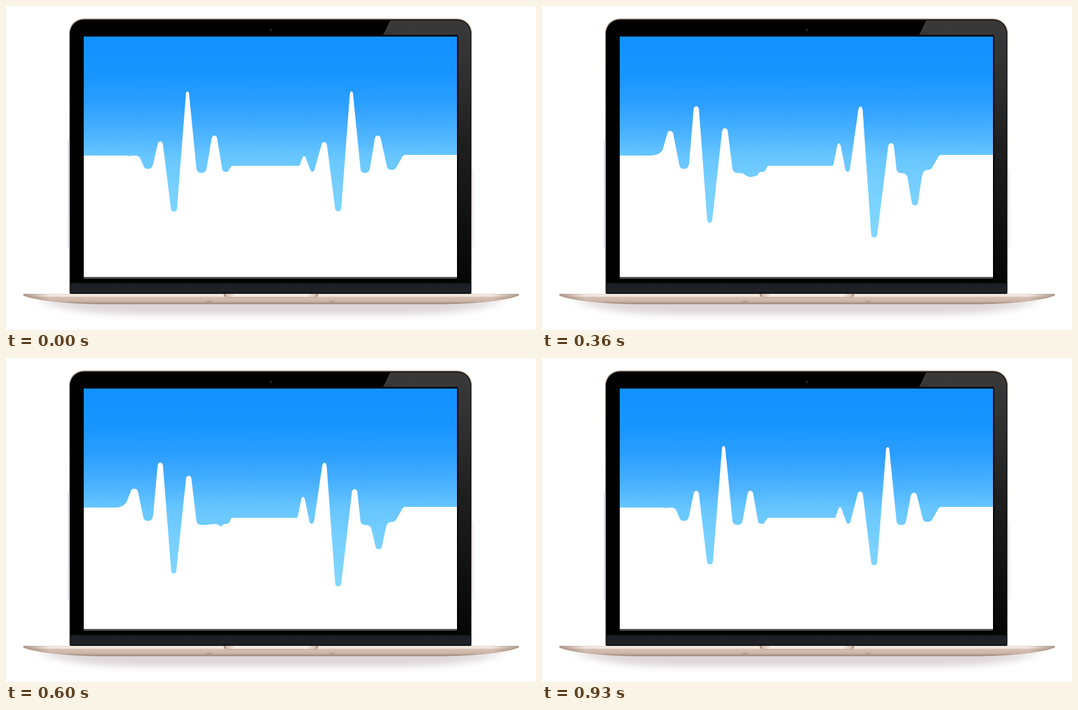
Write an HTML page with a canvas that moves like this. It is 852x520 px and loops after 960 ms.

```html
<!DOCTYPE html>
<html lang="en">
<head>
<meta charset="utf-8">
<title>Pulse on a laptop</title>
<style>
html, body { margin: 0; width: 100%; height: 100%; overflow: hidden; background: #fff; }
canvas { display: block; }
</style>
</head>
<body>
<canvas id="stage" width="852" height="520"></canvas>
<script>
const W = 852, H = 520, LOOP = 960, STEP = 30, TURN = 450, BUMP_FALL = 385;
const SCREEN = { x: 125, y: 49, w: 600, h: 386 };
const ctx = document.getElementById('stage').getContext('2d');

function gradient(c, x0, y0, x1, y1, stops) {
  const g = c.createLinearGradient(x0, y0, x1, y1);
  stops.forEach(([at, color]) => g.addColorStop(at, color));
  return g;
}

function box(c, x, y, w, h, fill, radii = 0) {
  c.beginPath();
  c.roundRect(x, y, w, h, radii);
  c.fillStyle = fill;
  c.fill();
}

function drawShadow(c) {
  c.save();
  c.filter = 'blur(6px)';
  c.beginPath();
  c.moveTo(48, 472);
  c.bezierCurveTo(90, 488, 150, 495, 230, 495);
  c.lineTo(622, 495);
  c.bezierCurveTo(702, 495, 762, 488, 804, 472);
  c.closePath();
  c.fillStyle = '#ddd5d8';
  c.fill();
  c.restore();
}

function drawLid(c) {
  box(c, 99.5, 215, 1.5, 172, '#dcd9e9');
  box(c, 750, 262, 1.5, 125, '#ece6ee');
  box(c, 99.5, 401, 1, 2, '#e9e2da');
  box(c, 99.5, 406, 1, 2, '#e9e2da');
  const rim = gradient(c, 0, 20, 0, 462, [[0, '#bfa99c'], [0.06, '#dcc8bb'], [1, '#eaddd4']]);
  box(c, 101, 20, 648.5, 443, rim, [24, 24, 4, 4]);
  box(c, 102.5, 21.5, 645.5, 441, '#000', [22.5, 22.5, 3, 3]);

  // Reflection along the right bezel
  c.save();
  c.beginPath();
  c.roundRect(104, 23, 643, 421, [21, 21, 0, 0]);
  c.clip();
  c.beginPath();
  c.moveTo(617.5, 23);
  c.lineTo(606, 47);
  c.lineTo(726, 47);
  c.lineTo(726, 444);
  c.lineTo(748, 444);
  c.lineTo(748, 23);
  c.closePath();
  c.fillStyle = gradient(c, 0, 23, 0, 444,
    [[0, '#393939'], [0.15, '#333'], [0.45, '#202020'], [0.75, '#111'], [1, '#060606']]);
  c.fill();
  c.restore();

  box(c, 123.5, 46.5, 603.5, 391.5, '#000', 2);
  box(c, 125, 436, 600, 1, '#b5b5b5');
  c.beginPath();
  c.arc(426, 38.5, 2, 0, 7);
  c.fillStyle = '#252525';
  c.fill();

  box(c, 104, 444, 643, 18,
    gradient(c, 0, 444, 0, 462, [[0, '#111316'], [0.15, '#1c1f23'], [0.8, '#1e2125'], [1, '#121315']]));
}

function drawBase(c) {
  c.beginPath();
  c.moveTo(28, 462);
  c.lineTo(824, 462);
  c.lineTo(824, 465);
  c.bezierCurveTo(800, 473, 760, 478.5, 690, 478.5);
  c.lineTo(162, 478.5);
  c.bezierCurveTo(92, 478.5, 52, 473, 28, 465);
  c.closePath();
  c.fillStyle = gradient(c, 0, 462, 0, 479, [
    [0, '#cbb5a8'], [0.06, '#f7ece5'], [0.24, '#f0e2d8'], [0.32, '#d6c0b2'],
    [0.7, '#cbb5a8'], [0.9, '#a69084'], [1, '#756860']]);
  c.fill();

  for (const [x0, x1] of [[28, 70], [824, 782]]) {
    c.save();
    c.clip();
    c.fillStyle = gradient(c, x0, 0, x1, 0, [[0, 'rgba(140,115,100,.7)'], [1, 'rgba(140,115,100,0)']]);
    c.fillRect(Math.min(x0, x1), 462, 42, 17);
    c.restore();
  }

  box(c, 350, 462, 152, 6, gradient(c, 350, 0, 502, 0, [
    [0, '#9b8172'], [0.035, '#d9c4b6'], [0.12, '#f6ebe4'],
    [0.88, '#f6ebe4'], [0.965, '#d9c4b6'], [1, '#9b8172']]), [0, 0, 5, 5]);
  box(c, 354, 467, 144, 1, '#b9a294');
  for (const x of [322, 520]) box(c, x, 473.5, 9, 1.5, '#a58f82', 1);
}

function makeLaptop() {
  const layer = document.createElement('canvas');
  layer.width = W;
  layer.height = H;
  const c = layer.getContext('2d');
  box(c, 0, 0, W, H, '#fff');
  drawShadow(c);
  drawLid(c);
  drawBase(c);
  box(c, SCREEN.x, SCREEN.y, SCREEN.w, SCREEN.h, gradient(c, 0, 49, 0, 435, [
    [0, '#1191ff'], [0.15, '#1795ff'], [0.28, '#2c9fff'], [0.4, '#4ab2ff'],
    [0.5, '#68c6ff'], [0.62, '#76cfff'], [0.8, '#80d6ff'], [1, '#84d8ff']]));
  return layer;
}

// Rounded turn at (x, y); the sides sit at the given distances and heights
function bend(x, y, left, leftRise, right, rightRise) {
  ctx.lineTo(x - left, y + leftRise);
  ctx.quadraticCurveTo(x - left * 0.8, y, x, y);
  ctx.quadraticCurveTo(x + right * 0.8, y, x + right, y + rightRise);
}

const tip = (x, y, half, rise) => bend(x, y, half, rise, half, rise);

function drawPulse(time) {
  const rising = time < TURN;
  const q = rising ? time / TURN : (LOOP - time) / (LOOP - TURN);
  const bump = rising ? q : Math.max(0, 1 - (time - TURN) / BUMP_FALL);
  const mix = (a, b, k = q) => a + (b - a) * k;

  ctx.beginPath();
  ctx.moveTo(125, 240);
  ctx.lineTo(mix(182, 173, bump), 240);
  ctx.quadraticCurveTo(187, 240, 193.5, mix(240, 232, Math.min(1, bump * 2)));
  bend(206, mix(240, 190.5, bump), mix(7, 3.8, bump), mix(1, 5, bump), mix(10, 3.8, bump), 5);
  bend(228, 261.5, 7, -5, 8.5, -8);
  tip(248, mix(217.5, 147), 4.3, 5);
  tip(mix(270, 269.5), mix(330, 352.5), mix(4.8, 3.8), -4);
  tip(mix(291.8, 294.6), mix(137, 211), mix(2.5, 5), 4);
  bend(314.5, 268, 8.3, -6, 8, mix(-7, 2.5));
  tip(335, mix(208, 291), mix(4.5, 4), mix(5, -2));
  bend(353.5, 266.3, mix(6, 7.5), mix(-4, 8), mix(5.5, 7), -4.5);
  bend(364.5, 256.5, 3, 2, 3, 0);
  bend(mix(471, 466), 256.5, 2, 0, 1.5, -2);
  tip(mix(479.3, 476.8), mix(241, 215.5), 3.2, mix(4.5, 6));
  bend(mix(492.6, 491), 266, 3.7, -4, 4, -6);
  tip(mix(511.5, 512), mix(218.5, 147), mix(4.5, 3.4), mix(5, 7));
  tip(534, mix(329.5, 382), 4.8, -4);
  tip(mix(555.3, 562.6), mix(137, 241), mix(2.5, 5), 4);
  bend(577.5, 268, 7.5, -5, mix(7.5, 10.5), mix(-7, 10));
  tip(mix(597.7, 599.8), mix(208, 348), 4.8, mix(5, -6));
  bend(620, 263, mix(7.5, 9.5), mix(-5, 13), 8, -5);
  bend(643, 239, 7, 5, 3, 0);
  ctx.lineTo(725, 239);
  ctx.lineTo(725, 435);
  ctx.lineTo(125, 435);
  ctx.closePath();
  ctx.fillStyle = '#fff';
  ctx.fill();
}

const laptop = makeLaptop();
let start;

function render(now) {
  start ??= now;
  const time = Math.floor(((now - start) % LOOP) / STEP) * STEP;
  ctx.drawImage(laptop, 0, 0);
  drawPulse(time);
  requestAnimationFrame(render);
}
requestAnimationFrame(render);
</script>
</body>
</html>
```
